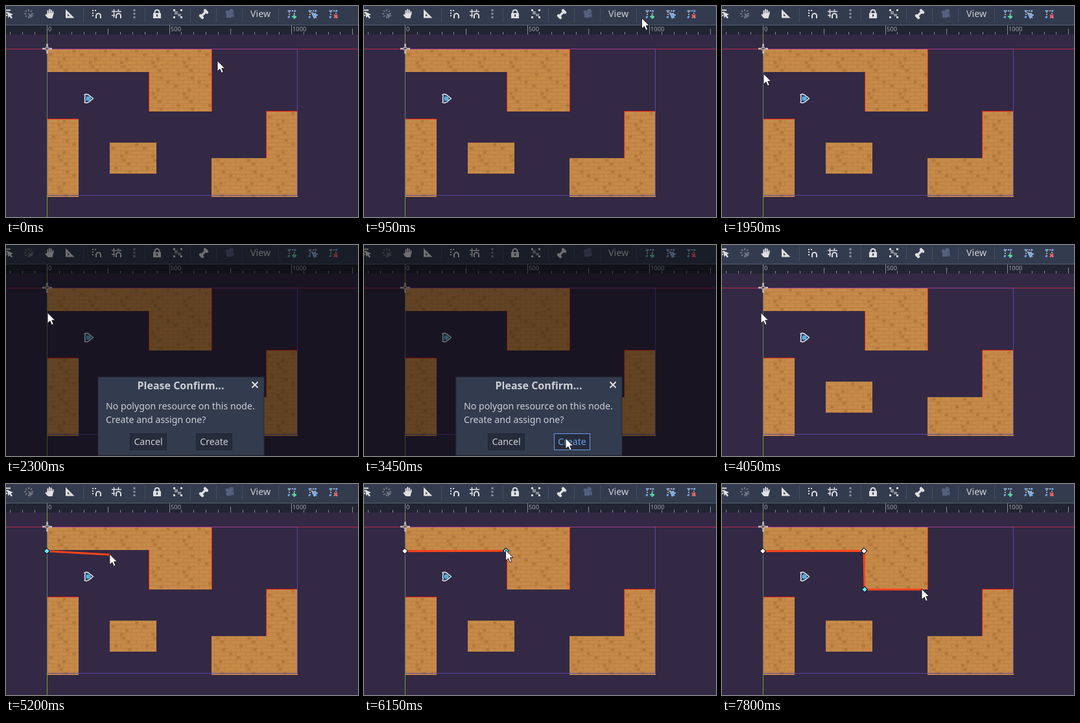
Animation, 543 px wide and 326 px high, one loop 8 s. Source, as an HTML page:

```html
<!DOCTYPE html>
<html lang="en">
<head>
<meta charset="utf-8">
<title>Polygon editor</title>
<style>
  html, body { margin: 0; width: 100%; height: 100%; overflow: hidden; background: #332945; }
  svg { display: block; width: 100vw; height: 100vh; font: 14.2px "Noto Sans", sans-serif; }
  text { fill: #cdcfd3; }
  .line { fill: none; stroke: #e0e0e0; stroke-width: 2; }
  .solid { fill: #e0e0e0; }
  .mid { text-anchor: middle; }
  .crisp { shape-rendering: crispEdges; }
  .edge { fill: none; stroke: #e11a16; vector-effect: non-scaling-stroke; }
</style>
</head>
<body>
<svg viewBox="0 0 543 326">
  <defs>
    <pattern id="bricks" patternUnits="userSpaceOnUse" width="4" height="4">
      <rect width="4" height="4" fill="#c78a49"/>
      <g id="courses" shape-rendering="geometricPrecision"></g>
    </pattern>
    <path id="corners" d="M-7-5.500H7M-7 5.500H7" stroke-width="3" stroke-dasharray="3 8"/>
    <g id="polygonTool">
      <path class="line" style="stroke-width:1.300" stroke-dasharray="2 1.500" d="M-4 5V-5H4V0"/>
      <use href="#corners" stroke="#69a5f0" transform="scale(.9)"/>
    </g>
    <path id="magnet" class="line" d="M-3.500 7V3.500a3.500 4 0 0 1 7 0V7"/>
  </defs>

  <!-- viewport: walls are laid out on a grid of 32-unit cells -->
  <rect width="543" height="326" fill="#332945"/>
  <g class="crisp">
    <g transform="translate(63.500 66.200) scale(12.0625)">
      <path fill="url(#bricks)" d="M0 0H21V8H13V3H0ZM0 9H4V19H0ZM8 12H14V16H8ZM28 8H32V19H21V14H28Z"/>
      <path class="edge" d="M13 3V8M21.030 0V8M28 14V8H32M0 9H4"/>
    </g>
    <g fill="none">
      <path stroke="#b92b49" d="M0 66.500H543"/>
      <path stroke="#72a02a" d="M63.500 44V326"/>
      <path stroke="#5a46c8" stroke-opacity=".4" d="M63.500 67V292"/>
      <path stroke="#a63a91" d="M63.500 66.500H449.500"/>
      <path stroke="#5a459f" d="M449.500 67V292.500H64"/>
    </g>
  </g>
  <g transform="translate(63.500 66)" fill="none" stroke="#c9c4c6">
    <path stroke-width="2.600" stroke-dasharray="4 7" d="M-7.500 0H7.500M0-7.500V7.500"/>
    <circle r="2.600" stroke-width="1.300"/>
  </g>
  <g transform="translate(127 143)">
    <path fill="#24406b" stroke="#f4f7fa" stroke-width="1.300" stroke-linejoin="round" d="M-6-6Q-2-8 2-4.500L7.500 0L2 4.500Q-2 8-6 6Q-4 3.500-5.500 2V-2Q-4-3.500-6-6Z"/>
    <ellipse rx="3.800" ry="3.500" fill="#5cabd3"/>
  </g>

  <!-- ruler -->
  <rect y="29" width="543" height="15" fill="#202531"/>
  <path class="crisp" stroke="#555c6b" d="M0 29.500H543"/>
  <g id="ruler" class="crisp" font-size="9.300"></g>

  <!-- toolbar -->
  <rect width="543" height="29" fill="#333b4f"/>
  <path id="separators" class="crisp" stroke="#444c61"/>
  <path class="line" d="M0 6.500H7M0 10.500H4M0 14.500H2"/>
  <path class="solid" d="M2 9L11 13L7.500 14.500L10 18L8 19.500L5.500 16L3.500 18.500Z"/>
  <g transform="translate(35 12)" opacity=".35">
    <path class="line" stroke-dasharray="3 8" d="M-7 0H7M0-7V7M-5-5L5 5M5-5L-5 5"/>
    <path class="solid" d="M-1-1L8 3L4 4.500L2.500 8Z"/>
  </g>
  <g class="line" stroke-linecap="round">
    <path d="M64.500 12V7.500M67.200 12V5.500M69.800 12V6.500M72.500 12V9M61.500 13.500L64 17"/>
    <path class="solid" stroke="none" d="M63.500 11H73.500L71.500 19H65L62.500 15Z"/>
  </g>
  <path class="solid" fill-rule="evenodd" d="M92 5L105.500 18.500H92ZM95 12V15.500H98.500Z"/>
  <use href="#magnet" x="142.500" y="12"/>
  <path class="line" stroke-dasharray="2 2" d="M133 7H140M134 10V17"/>
  <use href="#magnet" x="173.500" y="12"/>
  <path class="line" style="stroke-width:1.500" d="M163 8.500H178M163 14.500H168M166.500 5V18M173.500 5V9"/>
  <path stroke="#8a909c" stroke-width="3" stroke-dasharray="3 2.500" d="M198 5V19"/>
  <path class="line" d="M229.500 12V9.500a3.500 3.500 0 0 1 7 0V12"/>
  <path class="solid" fill-rule="evenodd" d="M227 11H239V19H227ZM232 13V16.500H234V13Z"/>
  <use href="#corners" stroke="#e0e0e0" x="265" y="12"/>
  <path fill="#868c98" d="M260 8h5v5h-5zM265 12h5v4h-5z"/>
  <g class="line" stroke-linecap="round">
    <path style="stroke-width:3.500" d="M301.500 15.500L308 9"/>
    <path style="stroke-width:4.500" d="M300 15L303 18M307 7L310 10"/>
  </g>
  <g fill="#56607f">
    <circle cx="347.500" cy="8" r="3.500"/><circle cx="341.500" cy="9.500" r="2.800"/>
    <path d="M340 10H348V13L351.500 10.500V18L348 16V18H340Z"/>
  </g>
  <text x="377" y="17">View</text>
  <use href="#polygonTool" x="441" y="12.500"/>
  <use href="#polygonTool" x="473" y="12.500"/>
  <use href="#polygonTool" x="505" y="12.500"/>
  <path stroke="#5fe0a0" stroke-width="2" d="M441 16.500H448M444.500 13V20"/>
  <path fill="#69a5f0" stroke="#e0e0e0" stroke-width=".7" d="M471 10L481 14L477 15.500L475.500 19.500Z"/>
  <path stroke="#ff6464" stroke-width="2" d="M506 13.500L511 18.500M511 13.500L506 18.500"/>

  <!-- polygon being drawn -->
  <polyline id="outline" fill="none" stroke="#fb441b" stroke-width="3"/>
  <g id="handles" stroke="#1d1826" stroke-width="1.200"></g>

  <g id="dialog">
    <rect width="543" height="326" opacity=".5"/>
    <rect x="142" y="204" width="256" height="121" fill="#333b4f" stroke="#262c3b"/>
    <text class="mid" x="269.500" y="222.500" font-size="16" font-weight="700">Please Confirm...</text>
    <path class="line" d="M379.500 211.500L388.500 220.500M388.500 211.500L379.500 220.500"/>
    <text x="154" y="254">No polygon resource on this node.</text>
    <text x="154" y="275">Create and assign one?</text>
    <g fill="#262c3b" stroke="#202531">
      <rect x="191.500" y="291.500" width="56" height="25"/>
      <rect id="createBox" x="293.500" y="291.500" width="55" height="25"/>
    </g>
    <text class="mid" x="219.500" y="309">Cancel</text>
    <text class="mid" x="321" y="309" id="createText">Create</text>
  </g>

  <path id="cursor" fill="#fff" stroke="#17131f" d="M0 .5V17L4 13.500L6.500 19.500L9.300 18.300L6.800 12.300H11.700Z"/>
</svg>
<script>
const $ = id => document.getElementById(id);
const LOOP = 8000, STEP = 50, UNIT = .377;

// Pointer moves: start ms, end ms, where the tip arrives
const moves = [
  [0, 500, 444, 14], [900, 1200, 233, 68], [1450, 1650, 79, 99], [1750, 1950, 64, 104],
  [2400, 3250, 311, 298], [3450, 3500, 303, 292], [3600, 4050, 60, 104], [4200, 4300, 61, 102],
  [4900, 5450, 235, 112], [5450, 5700, 218.5, 101.5],
  [6150, 6550, 220, 158], [7150, 7400, 218, 161.5], [7500, 7800, 308, 161.5]
];
const clicks = [[4950, 63, 103.700], [6150, 219, 103.300], [7550, 220, 163]];

const random = n => Math.abs(Math.sin(n * 12.9898) * 43758.5453) % 1;
const ease = p => p * p * (3 - 2 * p);

function buildBricks() {
  let mortar = '', dark = '';
  for (let row = 0; row < 8; row++) {
    const y = row / 2;
    mortar += `M0 ${y + .04}H4`;
    for (let k = 0; k < 3; k++) mortar += `M${(k + row % 2 / 2) * 4 / 3 + .1} ${y}v.5`;
    dark += `M${random(row + 1) * 3.5} ${y + .1}h.45v.32h-.45z`;
  }
  $('courses').innerHTML =
    `<path stroke="#b67d3f" stroke-width=".08" d="${mortar}"/><path fill="#b27839" d="${dark}"/>`;
}

function buildRuler() {
  let ticks = '', labels = '';
  for (let unit = -150; unit <= 1250; unit += 50) {
    const x = Math.floor(63.5 + unit * UNIT) + .5;
    const major = unit % 500 === 0;
    ticks += `M${x} ${major ? 30 : unit % 250 ? 40 : 35}V44`;
    if (major) labels += `<text x="${x + 1.5}" y="39" style="fill:#a4a8b1">${unit}</text>`;
  }
  $('ruler').innerHTML = `<path stroke="#858b98" d="${ticks}"/>${labels}`;
  $('separators').setAttribute('d', [119, 214, 284, 324, 364, 420].map(x => `M${x + .5} 2V25`).join(''));
}

function pointerAt(t) {
  return moves.reduce(([x, y], [from, to, nextX, nextY]) => {
    const e = ease(Math.min(1, Math.max(0, (t - from) / (to - from))));
    return [x + (nextX - x) * e, y + (nextY - y) * e];
  }, [326, 84]);
}

function draw(now) {
  const t = Math.floor(now % LOOP / STEP) * STEP;
  const [x, y] = pointerAt(t);
  $('cursor').setAttribute('transform', `translate(${x} ${y})`);

  const placed = clicks.filter(click => click[0] <= t).map(([, px, py]) => [px, py]);
  $('outline').setAttribute('points', placed.length ? [...placed, [x + 1, y + 1.5]].join(' ') : '');
  $('handles').innerHTML = placed.map(([px, py], i) =>
    `<path fill="${i === placed.length - 1 ? '#63efff' : '#fff'}" d="M${px} ${py - 4.5}l4.500 4.500l-4.500 4.500l-4.500-4.500z"/>`
  ).join('');

  $('dialog').style.display = t >= 2300 && t < 3500 ? '' : 'none';
  const hover = x > 293 && y > 291;
  $('createBox').style.stroke = hover ? '#699ce8' : '';
  $('createText').style.fill = hover ? '#699ce8' : '';
}

buildBricks();
buildRuler();
const start = performance.now();
function tick() {
  draw(performance.now() - start);
  requestAnimationFrame(tick);
}
tick();
</script>
</body>
</html>
```
